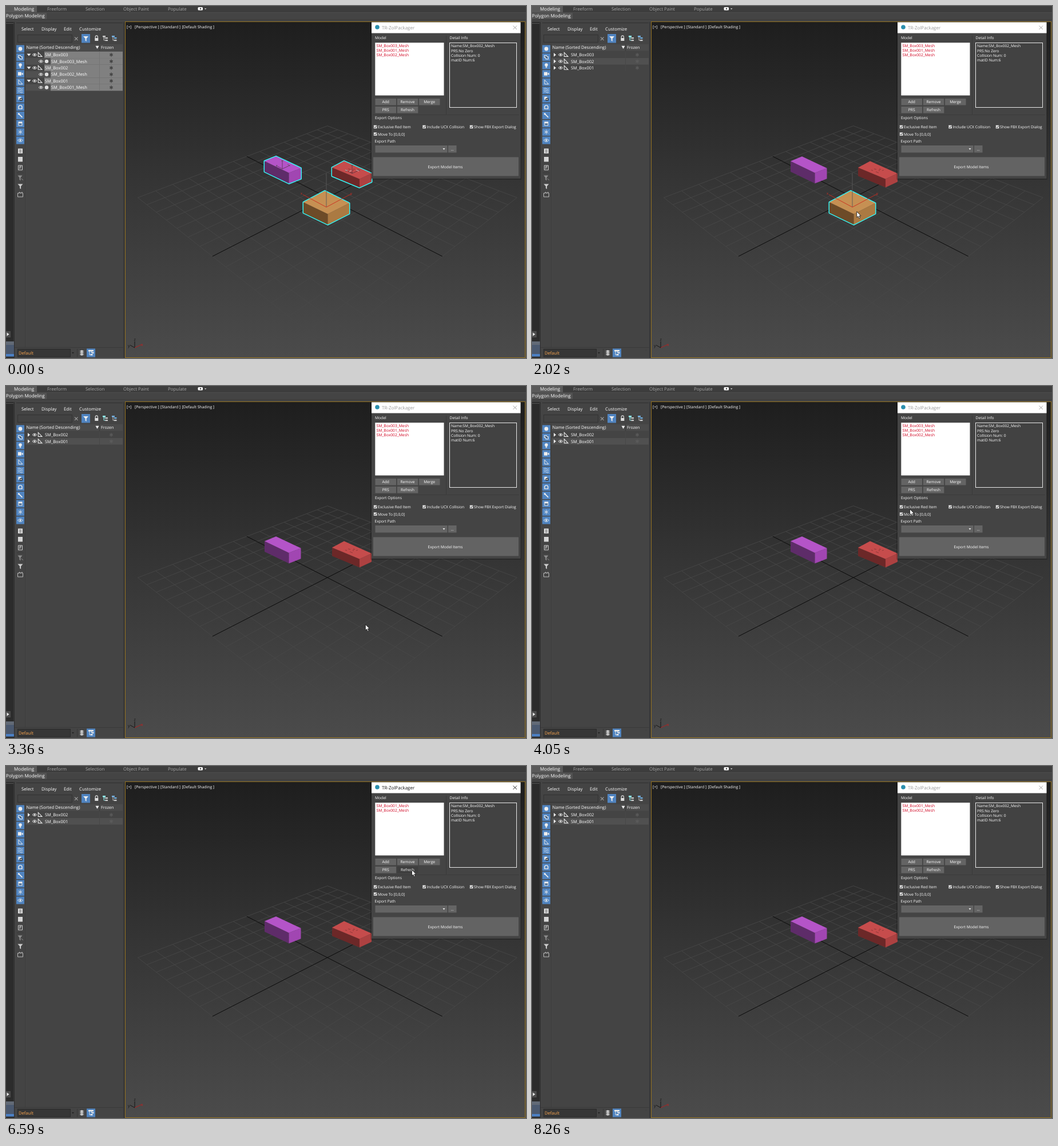
An HTML page for the animation above (8.4 s loop, 909 px wide and 616 px high).

```html
<!DOCTYPE html>
<html lang="en">
<head>
<meta charset="utf-8">
<title>Model export panel</title>
<style>
  html, body { margin: 0; width: 100%; height: 100%; overflow: hidden; background: #444; }
  svg { display: block; width: 100vw; height: 100vh; }
  text { font-family: "Open Sans", "Noto Sans", sans-serif; text-rendering: geometricPrecision; white-space: pre; }
</style>
</head>
<body>
<svg id="stage" viewBox="0 0 909 616" preserveAspectRatio="none"></svg>
<script>
const LOOP = 8400;
const DIM = '#c8c8c8', LIGHT = '#fff', BLUE = '#5084c0';

// ---------- drawing helpers ----------
const rect = (x, y, w, h, fill, more = '') =>
  `<rect x="${x}" y="${y}" width="${w}" height="${h}" fill="${fill}" ${more}/>`;
const text = (x, y, size, str, fill = LIGHT, more = '') =>
  `<text x="${x}" y="${y}" font-size="${size}" fill="${fill}" ${more}>${str}</text>`;
const mid = (x, y, str, fill = LIGHT) => text(x, y, 6.7, str, fill, 'text-anchor="middle"');
const line = (d, stroke, w = 1, more = '') =>
  `<path d="${d}" fill="none" stroke="${stroke}" stroke-width="${w}" ${more}/>`;
const shape = (d, fill, more = '') => `<path d="${d}" fill="${fill}" ${more}/>`;
const dot = (x, y, r, fill, more = '') => `<circle cx="${x}" cy="${y}" r="${r}" fill="${fill}" ${more}/>`;
const at = (x, y, body) => `<g transform="translate(${x} ${y})">${body}</g>`;
const group = (id, body) => `<g id="${id}">${body}</g>`;

// ---------- top ribbon ----------
function ribbon() {
  const tabs = [[72, 'Freeform'], [139, 'Selection'], [205, 'Object Paint'], [283, 'Populate']];
  return rect(0, 0, 909, 28, '#444') + rect(0, 0, 909, 11, '#3d3d3d') +
    rect(0, 0, 54, 11, '#5a5a5a') + rect(0, 11, 909, 1, '#4c4c4c') + rect(0, 12, 71, 11, '#535353') +
    rect(0, 23, 909, 1, '#3a3a3a') +
    text(14, 8.3, 8.1, 'Modeling') + tabs.map(([x, s]) => text(x, 8.3, 7.9, s, '#a8a8a8')).join('') +
    text(0, 20.4, 8.15, 'Polygon Modeling') +
    rect(335.5, 2, 8.5, 5.5, LIGHT, 'rx="1.5"') + dot(340, 4.7, 1.3, '#444') +
    shape('M347 4h3.4l-1.7 2.2z', DIM);
}

// ---------- scene explorer ----------
const toolIcons = [
  dot(0, 0, 3.4, '#eee'),
  line('M-3.5-3h4v4h-4zM-1-1h4.5v4.5H-1z', '#eee') + rect(-1, -1, 2, 2, '#222'),
  dot(0, -1, 2.8, '#eee') + rect(-1.2, 1.5, 2.4, 2.6, '#ddd'),
  rect(-4, -3, 6, 6, '#eee') + shape('M2 0l3-2.5v5z', '#eee'),
  line('M-3-4V3.5H4Z', '#eee'),
  [-3, 0, 3].map(y => line(`M-4.5 ${y}q2.2-2 4.5 0t4.5 0`, '#dce8f4')).join(''),
  rect(-3.5, -3.5, 5, 5, '#eee') + rect(-1, -1, 4.5, 4.5, '#222') + dot(1.2, 1.2, 1.2, '#eee'),
  line('M-3 3V0a3 3 0 0 1 6 0V3Z', '#eee', 1.4),
  line('M-3.5-3.5L3.5 3.5', '#eee', 1.6) + dot(-2.6, -2.6, 1.6, '#eee'),
  rect(-3.5, -3.5, 7, 7, '#eee') + rect(-2.5, -.5, 5, 3, '#46698f'),
  line('M0-4V4M-3.5-2L3.5 2M-3.5 2L3.5-2', '#eee', .9),
  line('M-4.5 0q4.5-5 9 0q-4.5 5-9 0z', '#eee', .9) + dot(0, 0, 1.5, '#eee')
];

function explorerFrame() {
  let out = rect(0, 28, 15, 588, '#2c2c2c') + rect(0, 30, 13, 1, '#555') + rect(13, 28, 1, 560, '#3a3a3a') +
    rect(0, 569, 8, 11, '#4c4c4c') + shape('M1.5 571.5v6l4-3z', '#eee') +
    rect(0, 587, 14, 6, '#626a76') + rect(0, 593, 14, 16, '#4b596f') + rect(0, 609, 14, 4.5, '#4c80c4') +
    rect(15, 28, 190, 588, '#444') + rect(18, 29, 186, 1, '#303030') + rect(205, 28, 3, 588, '#383838');
  [[27, 'Select'], [62, 'Display'], [101, 'Edit'], [128, 'Customize']]
    .forEach(([x, s]) => out += text(x, 43.2, 7.8, s));
  out += rect(20.5, 50.5, 95, 13, '#424242', 'stroke="#333"') +
    line('M120 54.5l5.5 5.5m0-5.5l-5.5 5.5', '#999', 1.1) +
    rect(132, 49, 15, 15.5, BLUE) + shape('M135 53h9l-3.4 4v5l-2-1.4V57z', '#eee') +
    line('M156.2 56v-2a2.1 2.1 0 0 1 4.2 0v2', '#ddd', 1.1) + rect(155.3, 56, 6, 5, '#ddd');
  out += group('treeIcon', line('M171 54v6h3M171 56h3', '#ccc', .9) + rect(169, 52, 5, 2.4, '#ccc')) +
    rect(173.5, 55, 4.5, 2.2, '#ccc') + rect(173.5, 59, 4.5, 2.2, '#ccc') +
    rect(185, 52, 5, 2.4, '#73b2e6') + line('M187 54v6h3', '#ccc', .9) +
    rect(189, 55, 4.5, 2.2, '#73b2e6') + rect(189, 59, 4.5, 2.2, '#ccc');
  out += rect(34, 67, 170, 11.5, '#4b4b4b') + text(35.5, 75, 7.55, 'Name (Sorted Descending)') +
    shape('M156.5 69.8h6l-3 5.2z', '#eee') + text(166, 75, 7.1, 'Frozen') + rect(163, 67, 1, 12, '#3a3a3a') +
    rect(33, 66, 1, 532, '#3e3e3e');
  toolIcons.forEach((icon, i) => {
    const y = 75 + i * 14.55;
    out += rect(18, y - 6.6, 14, 13.2, BLUE) + at(25, y, icon);
  });
  out += rect(21, 249.5, 8, 8.5, '#ddd') + line('M23 252h4m-4 2h4m-4 2h4', '#555', .8) +
    rect(21, 264, 8, 8.5, '#d6d6d6') +
    line('M21.5 279h7v8h-7zM24 285.5v-5h3m-3 2.2h2.4', '#ccc') +
    rect(19, 291.5, 12, 1, '#383838') +
    shape('M20.5 296.5h8l-3 4v5l-2-1.4v-3.6z', '#8c8c8c') + line('M27 302l3 3', '#8c8c8c') +
    shape('M20.5 311.5h9l-3.4 4v5l-2-1.4v-3.6z', '#ccc') +
    line('M20.5 327.5h2.5v-1.5h1.5v1.5h2.5v-1.5h1.5v1.5h1v6.5h-9z', '#bbb');
  // bottom bar
  out += rect(15, 597, 190, 1, '#3a3a3a') + rect(20.5, 600.5, 92, 13.5, '#363636', 'stroke="#2a2a2a"') +
    text(22, 609.8, 7.6, 'Default', '#ffa850') + shape('M115 606h4l-2 2.5z', '#222') +
    rect(124, 600, 1, 14, '#363636');
  [610, 607, 604].forEach(y =>
    out += shape(`M128 ${y}l4.5-2 4.5 2-4.5 2z`, '#ddd', 'stroke="#444" stroke-width=".5"'));
  return out + rect(141, 599.5, 15, 15, BLUE) + rect(144, 602, 9, 2.5, '#eee') +
    line('M146 604v6.5h2m1.5-6.5v3h2', '#eee', .9) + rect(148, 609, 3.5, 2.4, '#eee') +
    rect(150.5, 605.8, 3, 2.2, '#eee') + text(198, 604, 5, '··', '#333');
}

// row: [name, child, selected, open]
function tree(rows) {
  return rows.map(([name, child, selected, open], i) => {
    const y = 79.7 + i * 11.43, c = y + 5.7, x = child ? 11 : 0;
    const flake = selected ? '#3c3c3c' : '#5e5e5e';
    let out = i % 2 ? rect(34, y, 170, 11.4, '#505050') : '';
    if (selected) out += rect(67 + x, y, 137 - x, 11.5, '#808080');
    out += rect(163, y, 1, 11.43, selected ? '#747474' : '#474747');
    if (!child) out += shape(open ? `M36.5 ${c - 2}h7l-3.5 4.2z` : `M38 ${c - 3.3}v6.6l4-3.3z`, '#eee') +
      at(59, c, line('M-2.7-4V3H4Z', '#e6e6e6', 1.1));
    else out += dot(71, c, 3.2, '#e0e0e0');
    return out +
      at(50 + x, c, line('M-4 0q4-4.6 8 0q-4 4.4-8 0z', '#ddd', .9) + dot(0, -.2, 1.5, '#ddd')) +
      text(68 + x, c + 2.7, 7.5, name) +
      at(184, c, line('M0-3.5V3.5M-3-1.7L3 1.7M-3 1.7L3-1.7', flake, .9) +
        dot(0, 0, 1.8, 'none', `stroke="${flake}" stroke-width=".7"`));
  }).join('');
}
const box = n => 'SM_Box00' + n, mesh = n => box(n) + '_Mesh';
const openRows = n => [[box(n), false, true, true], [mesh(n), true, true]];
const trees = {
  treeAll: [3, 2, 1].flatMap(openRows),
  treeClosed: [3, 2, 1].map(n => [box(n)]),
  treeOne: [...openRows(3), [box(2)], [box(1)]],
  treeTwo: [[box(2)], [box(1)]]
};

// ---------- viewport ----------
// a runs to the lower right, b to the lower left, both from -1 to 1
function ground(a, b) {
  const k = 1 - .1755 * (a + b);
  return `${(561.8 + 165.7 * (a - b) / k).toFixed(2)} ${(335.3 + 84.8 * (a + b) / k).toFixed(2)}`;
}
function grid() {
  let d = '';
  for (let i = -7; i <= 7; i++) {
    if (!i) continue;
    const p = i / 7;
    d += `M${ground(p, -1)}L${ground(p, 1)}M${ground(-1, p)}L${ground(1, p)}`;
  }
  return line(d, '#4a4a4a', .8) +
    line(`M${ground(-1, 0)}L${ground(1, 0)}M${ground(0, -1)}L${ground(0, 1)}`, '#0a0a0a', 1);
}

// corners: left, back, right, front of the top face; h is the side height
function crate(id, [l, b, r, f], h, [top, left, right]) {
  const low = ([x, y]) => [x, y + h];
  const poly = pts => 'M' + pts.map(p => p.join(' ')).join('L') + 'Z';
  const hull = poly([l, b, r, low(r), low(f), low(l)]);
  return group(id + 'Edge', line(hull, '#35f4f4', 3, 'stroke-linejoin="round"')) +
    group(id, shape(poly([l, f, low(f), low(l)]), left) + shape(poly([f, r, low(r), low(f)]), right) +
      shape(poly([l, b, r, f]), top));
}
const smallAxes = (x, y) => at(x, y,
  line('M0 0V-15M0 0L-11-6M0 0L13-6', '#4a3040', .7) + line('M-9-7l-2 4m20-5l5 3M-2-14h4', '#555', .8));

function viewport() {
  return `<defs><linearGradient id="sky" x2="0" y2="1"><stop stop-color="#1e1e1e"/>
    <stop offset=".5" stop-color="#363636"/><stop offset="1" stop-color="#4b4b4b"/></linearGradient></defs>` +
    rect(208, 27, 701, 589, '#444') + rect(208.5, 27.5, 699, 588, 'url(#sky)', 'stroke="#957322"') +
    [[211, '[+]'], [225, '[Perspective ]'], [270, '[Standard ]'], [307.5, '[Default Shading ]']]
      .map(([x, s]) => text(x, 38.7, 6.8, s)).join('') +
    grid() +
    crate('purple', [[452, 271.5], [472, 263.3], [515.5, 283.8], [494.5, 292]], 18.5, ['#b454c8', '#5e2c69', '#a146b2']) +
    crate('red', [[570, 282.7], [591, 271.5], [639, 293], [618, 302.7]], 14.8, ['#c64c4c', '#6c2828', '#ad4141']) +
    line('M593 287l3 1m2-3l4 1m-1 4l5 2m1-7l3 1m2 2l3-1m-8-1v3', '#702c2c', .8, 'opacity=".75"') +
    crate('orange', [[520, 343.5], [557, 323.7], [600, 345], [562.5, 364]], 18.5, ['#c69053', '#6d4b28', '#ab7a42']) +
    group('sideAxes', smallAxes(483, 285) + smallAxes(605, 293) +
      line('M593 287l4 1m3 2l4-2m8-1l5 2', '#ddd', .8)) +
    group('gizmo', line('M560 352V296', '#5a5a5a', .9) + line('M560 352L519 330M560 352L603 329', '#cc2a1e', .9) +
      text(515, 329.5, 6, 'x', '#d03028') + text(602, 329.5, 6, 'y', '#d03028') + text(558.5, 295.5, 5.5, 'z', '#666')) +
    line('M225 598V587M225 598L217 593.5', '#151515', 1) + line('M225 598l12-5.5', '#b02020', 1) +
    text(223.6, 586, 7, 'z', '#151515') + text(213, 596.5, 7, 'y', '#151515') + text(236, 595, 7, 'x', '#c02222');
}

// ---------- dialog ----------
const button = (x, y, label, fill = '#646464') => rect(x, y, 36.5, 11.5, fill) + mid(x + 18.2, y + 8.2, label);
const check = (x, y, label) => rect(x - 7.2, y - 5.5, 5.6, 5.6, '#e8e8e8') +
  line(`M${x - 6.3} ${y - 2.7}l1.5 1.6 2.5-3.4`, '#333', 1) + text(x, y, 6.7, label);
const items = list => list.map((n, i) => text(647.5, 71.8 + i * 8.2, 6.75, mesh(n), '#d0021f')).join('');
const caption = fill => text(657, 40.8, 8, 'TR-ZolPackager', fill) +
  line('M886.5 34.5l6.5 6.5m0-6.5l-6.5 6.5', fill, .9);

function dialog() {
  const details = ['Name:' + mesh(2), 'PRS:No Zero', 'Collision Num: 0', 'matID Num:6'];
  return rect(637, 29, 264, 275, '#000', 'opacity=".18"') + rect(639, 28, 260.5, 274, '#444') +
    rect(639, 28.5, 260.5, 19, '#fff') + dot(649, 37, 3.8, '#2b8fae') +
    group('idle', caption('#999')) + group('active', caption('#111')) +
    text(645, 57.7, 6.7, 'Model') + text(775.5, 57.7, 6.7, 'Detail Info') +
    rect(645.3, 64.2, 120.2, 92.3, '#fff') + group('listFull', items([3, 1, 2])) + group('listShort', items([1, 2])) +
    rect(769, 52, 1, 138, '#3a3a3a') + rect(775.5, 64.5, 117, 113, '#424242', 'stroke="#e8e8e8"') +
    details.map((s, i) => text(778, 72.3 + i * 8.3, 6.65, s)).join('') +
    button(645.5, 162, 'Add') + button(683.8, 162, 'Remove') + button(722, 162, 'Merge') + button(645.5, 176, 'PRS') +
    group('plain', button(683.8, 176, 'Refresh')) + group('hover', button(683.8, 176, 'Refresh', '#3e3e3e')) +
    group('pressed', button(683.8, 176, 'Refresh', '#4a74ae')) +
    rect(641, 190, 256, 1, '#3c3c3c') + text(645, 197.7, 6.7, 'Export Options') +
    check(650, 214.2, 'Exclusive Red Item') + check(735.5, 214.2, 'Include UCX Collision') +
    check(818, 214.2, 'Show FBX Export Dialog') + check(650, 226.8, 'Move To [0,0,0]') +
    text(644.5, 239.2, 6.7, 'Export Path') + rect(645.5, 244, 126, 12.5, '#646464') +
    shape('M763.5 249h4l-2 2.8z', '#eee') + rect(773, 244, 14.5, 12.5, '#646464') + mid(780.2, 252.5, '...') +
    rect(642, 264.5, 254, 33, '#636363') + mid(768, 283.9, 'Export Model Items');
}

const pointer = group('pointer', group('click', dot(.5, 1.5, 7.8, '#d2d02e', 'opacity=".88"')) +
  shape('M0 0V10.2L2.4 8.2L4 12L5.8 11.2L4.2 7.5H7.3Z', '#fff', 'stroke="#111" stroke-width=".8"'));

document.getElementById('stage').innerHTML = ribbon() + explorerFrame() +
  Object.entries(trees).map(([id, rows]) => group(id, tree(rows))).join('') +
  viewport() + dialog() + pointer;

// ---------- timing ----------
// pointer path: time, x, y
const path = [
  [260, 534, 605], [530, 426.5, 395], [1000, 426.5, 395], [1200, 461.5, 356.5], [1400, 461.5, 356.5],
  [1850, 566, 358], [2050, 568, 360], [2230, 611, 406], [2300, 628.3, 417.3], [3430, 628.3, 417.3],
  [4050, 660.5, 215.5], [4190, 675, 206], [4600, 709.5, 181.8], [6980, 709.5, 181.8], [7770, 645, 606]
];
// visible spans for each part
const spans = {
  treeAll: [[0, 930]], treeClosed: [[930, 2300]], treeOne: [[2300, 3360]], treeTwo: [[3360, LOOP]],
  purpleEdge: [[0, 930]], redEdge: [[0, 930]], sideAxes: [[0, 930]],
  orange: [[0, 3360]], orangeEdge: [[0, 930], [1990, 3360]], gizmo: [[0, 930], [1990, 3360]],
  idle: [[0, 5150], [7910, LOOP]], active: [[5150, 7910]],
  listFull: [[0, 5430]], listShort: [[5430, LOOP]],
  plain: [[0, 4460], [7110, LOOP]], hover: [[4460, 5150], [5430, 7110]], pressed: [[5150, 5430]],
  pointer: [[260, 7840]], click: [[860, 940], [1900, 2020], [5150, 5430]]
};
const el = id => document.getElementById(id);
const parts = Object.entries(spans).map(([id, list]) => [el(id), list]);
const hand = el('pointer'), treeIcon = el('treeIcon');

function place(t) {
  const i = path.findIndex(p => p[0] > t);
  if (i < 0) return path[path.length - 1].slice(1);
  if (i === 0) return path[0].slice(1);
  const [t0, x0, y0] = path[i - 1], [t1, x1, y1] = path[i];
  const k = (t - t0) / (t1 - t0);
  return [x0 + (x1 - x0) * k, y0 + (y1 - y0) * k];
}

function draw(t) {
  for (const [node, list] of parts)
    node.style.display = list.some(([a, b]) => t >= a && t < b) ? '' : 'none';
  treeIcon.style.filter = t < 930 ? '' : 'sepia(1) hue-rotate(165deg) saturate(4)';
  hand.setAttribute('transform', `translate(${place(t).join(' ')})`);
}

const start = performance.now();
function tick() {
  draw((performance.now() - start) % LOOP);
  requestAnimationFrame(tick);
}
draw(0);
requestAnimationFrame(tick);
</script>
</body>
</html>
```
